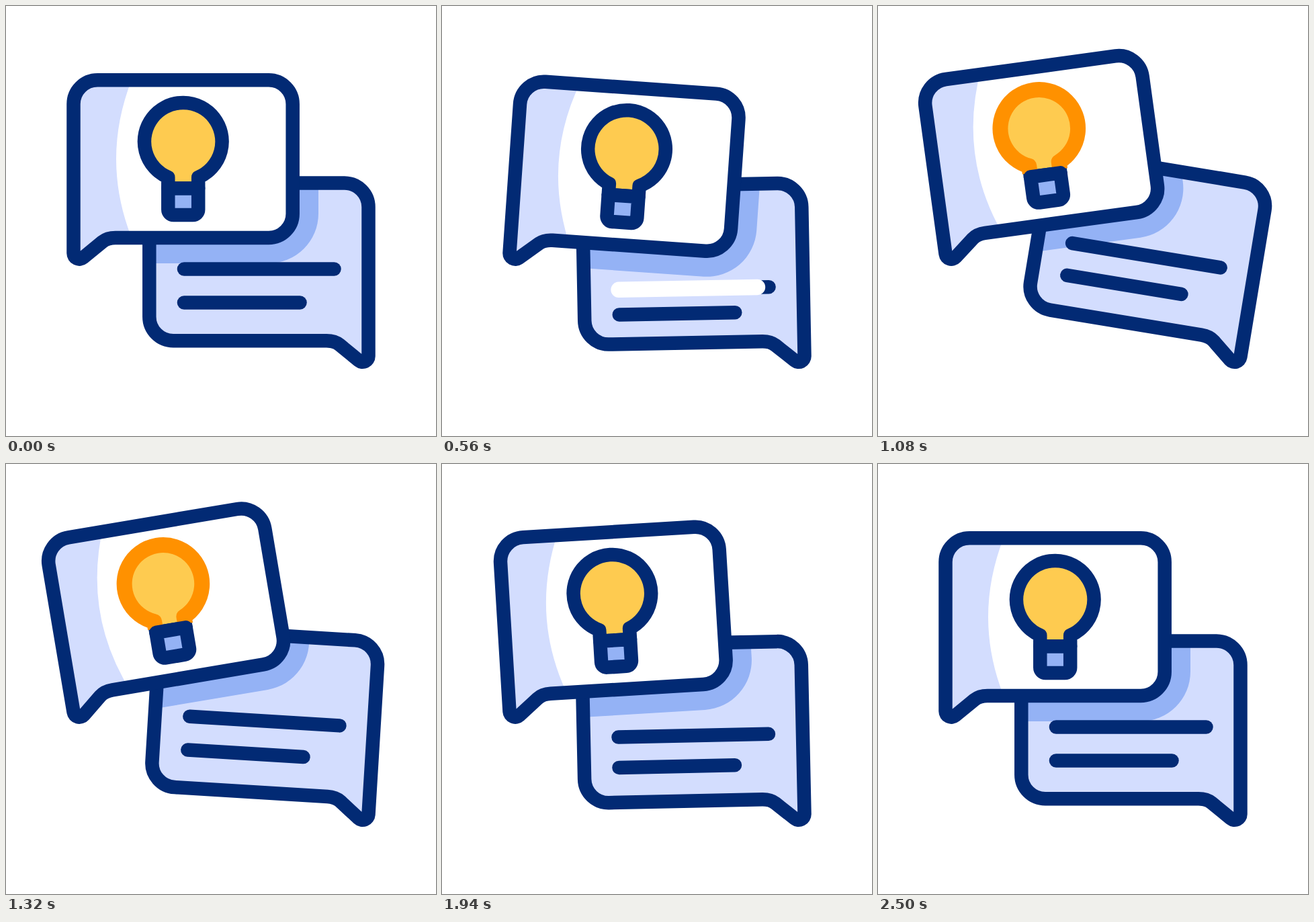
Recreate the animation shown at these times as an HTML page. Size 640 by 640 pixels, loop 2600 ms.

```html
<!DOCTYPE html>
<html>
<head>
<meta charset="utf-8">
<style>
html, body { margin: 0; height: 100%; overflow: hidden; background: #fff; }
svg { display: block; width: 100%; height: 100%; }
.ink { fill: none; stroke: #022a74; stroke-width: 20.5; stroke-linejoin: round; stroke-linecap: round; }
.wipe { stroke: #fff; stroke-width: 23.5; stroke-linecap: round; }
</style>
</head>
<body>
<svg viewBox="0 0 640 640">
  <defs>
    <path id="bubble" d="M100.5 146A35.7 35.7 0 0 1 136.2 110.3H391A35.7 35.7 0 0 1 426.7 146V309.3A35.7 35.7 0 0 1 391 345H163C156 345 149 346.5 143.5 351L114.7 374.7A8.7 8.7 0 0 1 100.5 368Z"/>
    <use id="mirrored" href="#bubble" transform="translate(640 153.2) scale(-1 1)"/>
    <clipPath id="inFront"><use href="#bubble"/></clipPath>
    <clipPath id="inBack"><use href="#bubble" transform="translate(640 153.2) scale(-1 1)"/></clipPath>
  </defs>

  <g id="back">
    <g clip-path="url(#inBack)">
      <rect width="640" height="640" fill="#d3ddfe"/>
      <rect id="shadow" x="62" y="72" width="403" height="311" rx="74" fill="#94b2f5"/>
    </g>
    <use href="#mirrored" class="ink"/>
    <g id="upper"><path class="ink"/><path class="wipe"/></g>
    <g id="lower"><path class="ink"/><path class="wipe"/></g>
  </g>

  <g id="front">
    <g clip-path="url(#inFront)">
      <rect width="640" height="640" fill="#fff"/>
      <path d="M90 100H191Q137 228 191 355V400H90Z" fill="#d3ddfe"/>
    </g>
    <use href="#bubble" class="ink"/>
    <path class="ink" style="fill:#fecb50" d="M241.3 271.5V255A57.8 57.8 0 1 1 286.2 255V271.5Z"/>
    <path id="glow" fill="none" stroke="#ff9100" stroke-width="23" stroke-linejoin="round" d="M241.3 266V255A57.8 57.8 0 1 1 286.2 255V266"/>
    <path class="ink" style="fill:#94b2f5" d="M241.3 271.5H286.2V303A8 8 0 0 1 278.2 311H249.3A8 8 0 0 1 241.3 303Z"/>
  </g>
</svg>
<script>
const LOOP = 2600;
const $ = id => document.getElementById(id);

function ease(from, to, t) {
  const x = Math.min(1, Math.max(0, (t - from) / (to - from)));
  return x * x * (3 - 2 * x);
}

// Rises from 0 to 1 at the peak time, then falls back to 0.
const bump = (from, peak, to, t) => ease(from, peak, t) - ease(peak, to, t);

// Eases through each angle in turn, starting and ending at rest.
const swing = (times, angles, t) => angles.reduce(
  (sum, angle, i) => sum + angle * bump(times[i], times[i + 1], times[i + 2], t), 0);

const frontTilt = t => swing([200, 425, 1290, 1600, 2000, 2380], [5, -10, 5, -4], t);
const backTilt = t => swing([200, 470, 1040, 1270, 1480, 1650, 2000, 2400], [-1.9, 10, 2.6, 8.6, 2.2, -1.5], t);
const lineDrop = t => 26 * bump(200, 580, 1220, t) + 20 * bump(1300, 1640, 2220, t);
const glow = t => ease(700, 915, t) - ease(1400, 1600, t);

const turnFront = a => `rotate(${a} 109.2 368)`;
const turnBack = a => `rotate(${a} 530.8 521)`;

// A white stroke runs along the line until `full`, then leaves it the same way.
function drawLine(id, y, width, drop, full, t) {
  const [ink, wipe] = $(id).children;
  const stroke = (from, to) => `M${265 + width * from} ${y + drop}H${265 + width * to}`;
  const head = ease(full - 230, full, t), tail = ease(full, full + 200, t);
  ink.setAttribute('d', stroke(0, 1));
  wipe.setAttribute('d', head > tail ? stroke(tail, head) : '');
}

function draw(t) {
  const a = frontTilt(t), b = backTilt(t), drop = lineDrop(t);
  $('front').setAttribute('transform', turnFront(a));
  $('back').setAttribute('transform', turnBack(b));
  $('shadow').setAttribute('transform', turnBack(-b) + turnFront(a));
  $('glow').setAttribute('opacity', glow(t));
  drawLine('upper', 391.5, 223.5, drop, 600, t);
  drawLine('lower', 441.5, 172.5, drop / 2, 800, t);
}

const start = performance.now();
function tick() {
  draw((performance.now() - start) % LOOP);
  requestAnimationFrame(tick);
}
tick();
</script>
</body>
</html>
```
